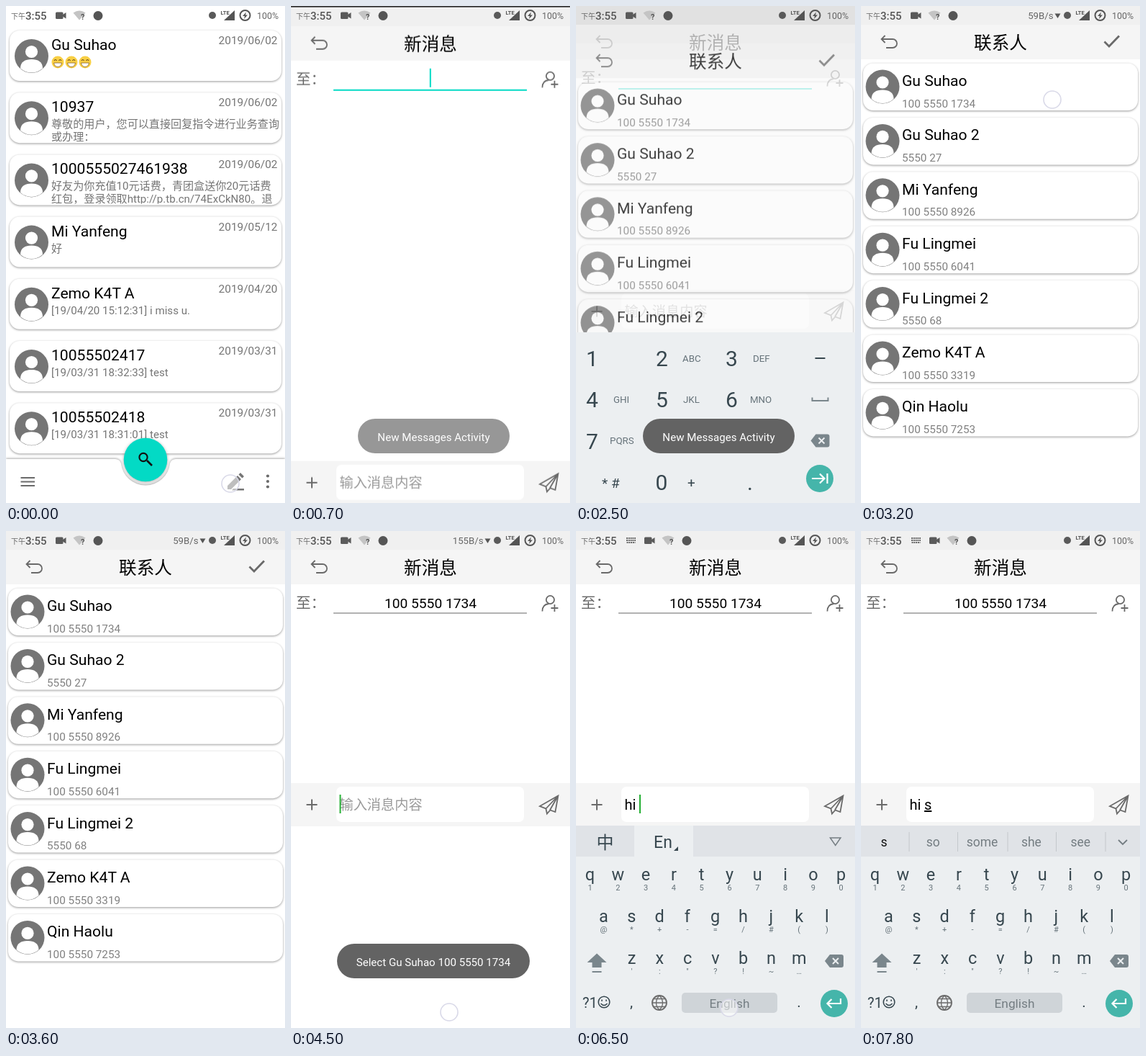
Recreate the animation shown at these times as an HTML page. Size 388 px wide and 690 px high, loop 8000 ms.

```html
<!DOCTYPE html>
<html lang="zh-CN">
<head>
<meta charset="utf-8">
<title>Messages</title>
<style>
html, body { margin: 0; width: 100%; height: 100%; overflow: hidden; background: #333; }
svg { display: block; width: 388px; height: 690px; font-family: Roboto, "Noto Sans CJK SC", "Noto Sans CJK", sans-serif; }
text { white-space: pre; }
.mid { text-anchor: middle; }
.end { text-anchor: end; }
.ico { fill: none; stroke: #6a6a6a; stroke-width: 1.8; }
.card { fill: #fff; filter: drop-shadow(0 1.5px 1.5px #0006); }
.name { font-size: 21.1px; }
.body { font-size: 15.1px; fill: #757575; }
.title { font-size: 24.6px; text-anchor: middle; }
.key { fill: #37474f; }
.sub { fill: #66737a; }
.ring { fill: #fff8; stroke: #d9d9e8; stroke-width: 1.6; }
.popup { fill: #fafafa; filter: drop-shadow(0 1px 2px #0005); }

/* One loop is 8 s, so 1% is 80 ms. */
.list, .compose, .people, .bar, .numpad, .qwerty, .toast1, .toast2, .tray { animation: 8s linear infinite; }
.list { animation-name: list-fade; }
.compose { animation-name: compose-fade, compose-slide; }
.people { animation-name: people-fade, people-slide; }
.bar { animation-name: bar; animation-timing-function: step-end; }
.numpad { animation-name: numpad; }
.qwerty { animation-name: qwerty; }
.toast1 { animation-name: toast1; }
.toast2 { animation-name: toast2; }
.tray { animation-name: tray; animation-timing-function: step-end; }

@keyframes list-fade {
  0%, 4.8125% { opacity: 1 } 7.3125% { opacity: .9 } 7.32%, 100% { opacity: 0 }
}
@keyframes compose-fade {
  0%, 4.8125% { opacity: 0 } 7.3125%, 29.425% { opacity: 1 } 31.925% { opacity: .9 }
  31.93%, 51.87% { opacity: 0 } 51.875%, 100% { opacity: 1 }
}
@keyframes compose-slide {
  0%, 4.8125% { transform: translateY(55px); animation-timing-function: cubic-bezier(.33, .4, .7, .95) }
  9.1875%, 100% { transform: none }
}
@keyframes people-fade {
  0%, 29.425% { opacity: 0 } 31.925%, 51.875% { opacity: 1 } 54.375%, 100% { opacity: 0 }
}
@keyframes people-slide {
  0%, 29.425% { transform: translateY(55px); animation-timing-function: cubic-bezier(.33, .4, .7, .95) }
  33.8%, 51.875% { transform: translateY(0); animation-timing-function: ease-in }
  54.375%, 100% { transform: translateY(55px) }
}
@keyframes bar {
  0% { transform: translateY(630px) } 21.25% { transform: translateY(394px) }
  35% { transform: translateY(630px) } 55.625%, 100% { transform: translateY(350px) }
}
@keyframes numpad {
  0%, 23.125% { transform: translateY(237px); animation-timing-function: ease-out }
  25%, 32.5% { transform: translateY(0); animation-timing-function: ease-in }
  34.375%, 100% { transform: translateY(237px) }
}
@keyframes qwerty {
  0%, 58.125% { transform: translateY(281px); animation-timing-function: ease-out }
  60.625%, 100% { transform: none }
}
@keyframes toast1 {
  0%, 6.25% { opacity: 0 } 10%, 33.125% { opacity: 1 } 36.875%, 100% { opacity: 0 }
}
@keyframes toast2 {
  0%, 45.6% { opacity: 0 } 48.75%, 67.5% { opacity: 1 } 71.25%, 100% { opacity: 0 }
}
@keyframes tray {
  0% { transform: none } 60.625%, 100% { transform: translateX(26px) }
}
</style>
</head>
<body>
<svg id="stage" viewBox="0 0 388 690"></svg>
<script>
const TEAL = '#03dac5', PHONE = '100 5550 1734', PERSON = 'Gu Suhao';

const text = (x, y, size, s, attrs = '') => `<text x="${x}" y="${y}" font-size="${size}" ${attrs}>${s}</text>`;
const path = (d, attrs = 'class="ico"') => `<path d="${d}" ${attrs}/>`;
const rect = (x, y, w, h, fill, rx = 0, attrs = '') =>
  `<rect x="${x}" y="${y}" width="${w}" height="${h}" rx="${rx}" fill="${fill}" ${attrs}/>`;
const circle = (x, y, r, attrs) => `<circle cx="${x}" cy="${y}" r="${r}" ${attrs}/>`;
const group = (cls, s, attrs = '') => `<g class="${cls}" ${attrs}>${s}</g>`;
const during = (spans, s) => `<g data-on="${spans}">${s}</g>`;
const at = (x, y, s) => `<g transform="translate(${x} ${y})">${s}</g>`;
const ring = (x, y, spans) => during(spans, circle(x, y, 12, 'class="ring"'));

const avatar = (x, y) => at(x, y, circle(0, 0, 23.5, 'fill="#757575"') +
  circle(0, -6, 8.6, 'fill="#fff"') +
  path('M-15.5 17C-15.5 8-9 4.500 0 4.500S15.500 8 15.500 17A23 23 0 0 1-15.500 17Z', 'fill="#fff"'));

const grin = x => circle(x, 78, 8.5, 'fill="#f8cf45"') +
  path(`M${x - 5} 76q1.800-3 3.500 0M${x + 1.5} 76q1.800-3 3.500 0`, 'fill="none" stroke="#6b4a1c" stroke-width="1.200"') +
  path(`M${x - 5.5} 79h11q-1 5.500-5.500 5.500t-5.500-5.500z`, 'fill="#fff" stroke="#8a6427" stroke-width=".8"');

// Message list
const threads = [
  [PERSON, '2019/06/02'],
  ['10937', '2019/06/02', '尊敬的用户，您可以直接回复指令进行业务查询', '或办理：'],
  ['1000555027461938', '2019/06/02', '好友为你充值10元话费，青团盒送你20元话费', '红包，登录领取http://p.tb.cn/74ExCkN80。退'],
  ['Mi Yanfeng', '2019/05/12', '好'],
  ['Zemo K4T A', '2019/04/20', '[19/04/20 15:12:31] i miss u.'],
  ['10055502417', '2019/03/31', '[19/03/31 18:32:33] test'],
  ['10055502418', '2019/03/31', '[19/03/31 18:31:01] test'],
];
const thread = ([name, date, ...lines], i) => at(0, 34 + i * 86.2,
  rect(5, 0, 378, 70, '#fff', 14, 'class="card"') + avatar(35.5, 35.5) +
  text(63, 27, 21.1, name) + text(377.5, 19, 15.4, date, 'class="end" fill="#757575"') +
  `<g clip-path="url(#clip)">${lines.map((s, n) => text(63, 49 + n * 18, 15.1, s, 'class="body"')).join('')}</g>`);

const list = rect(0, 0, 388, 690, '#fff') + threads.map(thread).join('') + grin(72) + grin(91) + grin(110) +
  path('M0 629H152q6 0 8 6a34.200 34.200 0 0 0 68 0q2-6 8-6H388V690H0Z',
    'fill="#fff" style="filter:drop-shadow(0 -1px 1.500px #0005)"') +
  circle(194, 630, 30.3, `fill="${TEAL}" style="filter:drop-shadow(0 1px 2px #0005)"`) +
  path('M196 631l7 7', 'stroke="#111" stroke-width="2.600"') +
  circle(191, 626.5, 5.6, 'fill="none" stroke="#111" stroke-width="2.100"') +
  path('M20.500 655h19.500M20.500 660.500h19.500M20.500 666h19.500', 'class="ico" style="stroke-width:2"') +
  path('M308 671v-5l14-14 5 5-14 14zM323.500 650.500l2.500-2.500 5 5-2.500 2.500zM316 670h15v2.500h-17z', 'fill="#757575"') +
  [652.5, 660, 667.5].map(y => circle(364, y, 2.1, 'fill="#6a6a6a"')).join('');

// Compose and contact screens
const header = title => rect(0, 0, 388, 690, '#fff') + rect(0, 0, 388, 74, '#f5f5f5') + rect(0, 0, 388, 26, '#f0f0f0') +
  path('M33.500 41l-5 5 5 5M28.500 46H44a6 6 0 0 1 0 12H35') + text(194, 59.5, 24.6, title, 'class="title"');
const caret = (x, spans) => during(spans, rect(x, 16, 2, 26, '#25b034'));
const typed = (x, s, spans, deco = 'underline') => during(spans, text(x, 37, 20, s, `text-decoration="${deco}"`));

const bar = rect(0, 0, 388, 60, '#f5f5f5') + rect(63, 5, 261, 49, '#fff', 7) +
  path('M21.500 30h15M29 22.500v15', 'class="ico" style="stroke-width:2"') +
  path('M371.500 17.500L346 32l8.500 3.500 1.500 7 4.500-5 7 2.500zM371.500 17.500L354.500 35.500M371.500 17.500L360 37.500') +
  during('0-5850', text(67.5, 37, 19.2, '输入消息内容', 'fill="#9a9a9a"')) +
  typed(67.5, 'h', '5850-6120') + typed(67.5, 'hi', '6120-6500') +
  typed(67.5, 'hi', '6500-8000', 'none') + typed(88, 's', '7050-8000') +
  caret(67.5, '4450-4950 5450-5850') + caret(79, '5850-6120') + caret(83, '6120-6500') +
  caret(88, '6500-7000') + caret(99, '7050-7550');

const compose = header('新消息') + text(7, 107, 20.5, '至：', 'fill="#6a6a6a"') +
  during('0-4450', rect(59, 114, 269, 2, TEAL)) + during('4450-8000', rect(59, 113.5, 269, 1, '#666')) +
  during('600-1100 1600-2100', rect(192.8, 85, 2, 26, TEAL)) +
  during('3700-8000', text(194, 106.5, 19.2, PHONE, 'class="mid"')) +
  circle(360.5, 95.5, 5.6, 'class="ico"') + path('M349.500 111.500c0-7 4-10 9-10.500M366.500 102v10M361.500 107h10') +
  group('bar', bar);

const contacts = [
  [PERSON, PHONE], [PERSON + ' 2', '5550 27'], ['Mi Yanfeng', '100 5550 8926'], ['Fu Lingmei', '100 5550 6041'],
  ['Fu Lingmei 2', '5550 68'], ['Zemo K4T A', '100 5550 3319'], ['Qin Haolu', '100 5550 7253'],
];
const people = header('联系人') + path('M338.500 49.500l6.500 6.500 14-14.500', 'class="ico" style="stroke-width:2.800"') +
  contacts.map(([name, phone], i) => at(0, 79.5 + i * 75.4,
    rect(3, 0, 382, 65.5, '#fff', 14, 'class="card"') + avatar(30, 32.5) +
    text(57, 31.5, 21.1, name) + text(57, 61, 15.3, phone, 'fill="#808080"'))).join('');

// Keyboards
const erase = (x, y) => at(x, y,
  path('M-13 0l7-9H10q3 0 3 3V6q0 3-3 3H-6z', 'fill="#7a868c"') +
  path('M-2 -4l8 8M6 -4l-8 8', 'stroke="#eceff1" stroke-width="2"'));
const action = (x, d) => circle(x, 656, 19, 'fill="#45b5aa"') +
  path(d, 'fill="none" stroke="#fff" stroke-width="2.200"');

const pads = [['1', ''], ['2', 'ABC', 148], ['3', 'DEF', 246], ['4', 'GHI', 52], ['5', 'JKL', 149], ['6', 'MNO', 242],
  ['7', 'PQRS', 47], ['8', 'TUV', 148], ['9', 'WXYZ', 241]];
const numpad = rect(0, 453, 388, 237, '#eceff1') +
  pads.map(([d, s, x], i) => {
    const y = 489 + Math.floor(i / 3) * 57.4;
    return text(14 + i % 3 * 97, y + 11, 30, d, 'class="key"') + text(x || 0, y + 4.5, 13.3, s, 'class="sub"');
  }).join('') +
  text(36, 669, 19, '* #', 'class="key"') + text(110.5, 672, 30, '0', 'class="key"') +
  text(155, 668, 19, '+', 'class="key"') + text(238, 672, 30, '.', 'class="key"') +
  rect(332.5, 488, 14, 2, '#37474f') +
  path('M328.500 543.500v4.500h22v-4.500', 'fill="none" stroke="#7a868c" stroke-width="2"') + erase(339.5, 603.5) +
  action(339, 'M328 656h17M339 649.500l6.500 6.500-6.500 6.500M349.500 649v14');

const rows = [
  ['qwertyuiop', '1234567890', 19.5, 485],
  ['asdfghjkl', '@*+-=/#()', 38.5, 542.5],
  ['zxcvbnm', "':\"?!~…", 77.5, 600.5],
];
const letters = rows.map(([keys, subs, x0, y]) => [...keys].map((k, i) =>
  text(x0 + i * 38.8, y, 23.5, k, 'class="mid key"') + text(x0 + i * 38.8, y + 14, 11, subs[i], 'class="mid sub"')
).join('')).join('');

const words = (spans, list) => during(spans,
  list.split(' ').map((w, i) => text(32 + i * 68.3, 438, 17.5, w, `class="mid" fill="${i ? '#747d82' : '#111'}"`)).join('') +
  [67, 134.5, 204, 271.5, 340].map(x => rect(x - .5, 418, 1, 27, '#c3c8cc')).join('') +
  path('M358 429l6 6 6-6', 'fill="none" stroke="#747d82" stroke-width="1.800"'));
const popup = (x, y, k, spans) => during(spans,
  rect(x - 25, y - 100, 50, 58, '#fafafa', 4, 'class="popup"') + text(x, y - 64, 28, k, 'class="mid key"'));

const langs = during('0-5850 6500-7050', rect(81, 409, 82, 44, '#eceff1') +
  text(40.5, 441, 24, '中', 'class="mid key"') + text(121, 440, 23, 'En', 'class="mid key"') +
  path('M142 438v6h-6z', 'fill="#37474f"') +
  path('M353.500 426h14.500l-7.200 10.500z', 'fill="none" stroke="#747d82" stroke-width="1.500"'));

const qwerty = rect(0, 409, 388, 281, '#eceff1') + rect(0, 409, 388, 43, '#e0e3e7') + langs +
  words('5850-6120', 'h he how her have') + words('6120-6500', 'hi his him hit high') +
  words('7050-8000', 's so some she see') + letters +
  path('M29 586.500l13.500 12.500h-7v7h-13v-7h-7zM22.500 611h13v2h-13z', 'fill="#7a868c"') + erase(359, 597) +
  text(9, 662, 20, '?1', 'class="key"') + circle(39, 654, 7.8, 'fill="none" stroke="#37474f" stroke-width="1.600"') +
  path('M34.500 656q4.500 5 9 0M36 650.500v2.500M42 650.500v2.500', 'fill="none" stroke="#37474f" stroke-width="1.500"') +
  text(77, 661, 21, ',', 'class="mid key"') + text(310, 661, 21, '.', 'class="mid key"') +
  circle(116, 655, 10, 'class="ico"') +
  path('M106 655h20M108 649.500h16M108 660.500h16M116 645c-6 6-6 14 0 20c6-6 6-14 0-20', 'class="ico" style="stroke-width:1.300"') +
  rect(147, 641, 133, 28, '#cfd4d8', 5) + text(213.5, 661.5, 17.3, 'English', 'class="mid" fill="#747d82"') +
  action(359, 'M368 649v7H350M355.500 650l-6 6 6 6') +
  popup(232.5, 542.5, 'h', '5820-6000') + popup(291, 485, 'i', '6080-6250') + popup(77.3, 542.5, 's', '7020-7500');

// Overlays
const toast = (cls, x, w, s) => group(cls, rect(x, 573, w, 48, '#636363', 24) +
  text(x + w / 2, 603.5, 15.1, s, 'class="mid" fill="#fff"'));
const speed = (spans, s) => during(spans, text(267.5, 18, 13.2, s, 'class="end" fill="#666"') +
  path('M269.500 10.500h8l-4 6.500z', 'fill="#555"'));

const status =
  text(7, 18, 10, '下午', 'fill="#666"') + text(27, 19, 15, '3:55', 'fill="#555" font-weight="500"') +
  during('4850-8000', path('M70 10h13M70 13h13M70.500 16h12', 'fill="none" stroke="#666" stroke-width="2" stroke-dasharray="2 .8"')) +
  group('tray', rect(69, 8.5, 10.5, 9.5, '#5a5a5a', 1.5) + path('M79 12l4.500-3v8.500l-4.500-3z', 'fill="#5a5a5a"') +
    path('M93.500 9.500q8.500-6 17 0l-8.500 10z', 'fill="#c4c4c4"') + text(104, 19, 11, '?', 'fill="#555" font-weight="700"') +
    circle(128, 13.5, 6.5, 'fill="#555"')) +
  speed('2900-3700', '59B/s') + speed('3700-4800', '155B/s') +
  circle(287, 13, 5, 'fill="#5a5a5a"') + text(298.5, 12, 7.5, 'LTE', 'fill="#555" font-weight="700"') +
  path('M318 6v14h-15z', 'fill="#555"') + circle(332.5, 13, 7, 'fill="none" stroke="#555" stroke-width="2"') +
  path('M334 8.500l-5 5.500h3l-1 4 5-5.500h-3z', 'fill="#555"') + text(349, 18, 12.4, '100%', 'fill="#666"');

const stage = document.getElementById('stage');
stage.innerHTML =
  '<defs><clipPath id="clip"><rect width="383" height="68"/></clipPath></defs>' +
  group('list', list) + group('compose', compose) + group('people', people) +
  group('numpad', numpad) + group('qwerty', qwerty) +
  toast('toast1', 93, 211, 'New Messages Activity') + toast('toast2', 64, 268, `Select ${PERSON} ${PHONE}`) + status +
  ring(312, 663, '0-300') + ring(360, 100, '2150-2350') + ring(266, 130, '3150-3300') + ring(220, 668, '4400-4600') +
  ring(213, 662, '6420-6600') + ring(77, 550, '7020-7300');

// Turn each data-on list of "from-to" times (ms) into hard on/off keyframes.
const rules = document.createElement('style');
stage.querySelectorAll('[data-on]').forEach((el, i) => {
  const steps = el.dataset.on.split(' ').map(span => {
    const [from, to] = span.split('-').map(ms => ms / 80 + '%');
    return `${from}{opacity:1}${to}{opacity:0}`;
  });
  rules.textContent += `@keyframes on${i}{0%{opacity:0}${steps.join('')}}`;
  el.style.animation = `on${i} 8s step-end infinite`;
});
document.head.append(rules);
</script>
</body>
</html>
```
